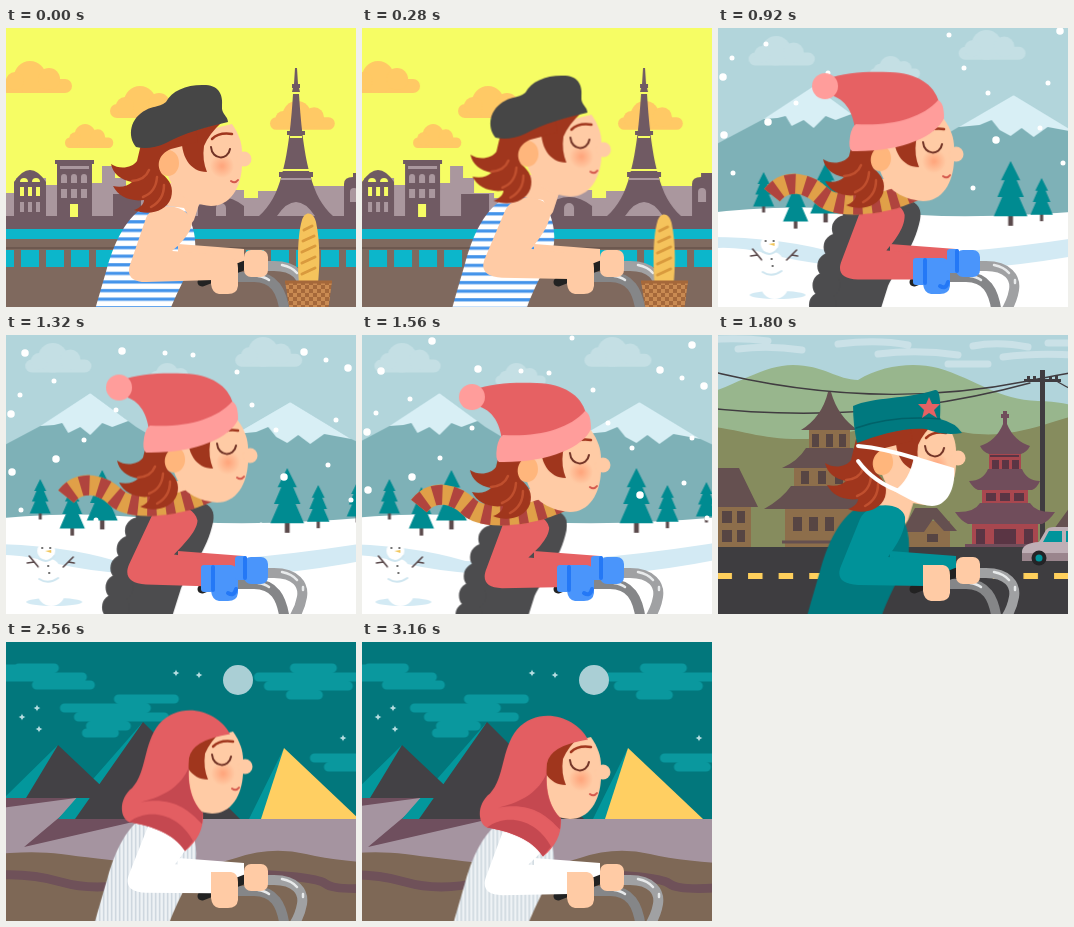
Write an HTML page without scripts that moves like this. It is 350 by 279 pixels and loops after 3200 ms.

```html
<!DOCTYPE html>
<html lang="en">
<head>
<meta charset="utf-8">
<title>Cycling round the world</title>
<style>
html, body { margin: 0; width: 100%; height: 100%; overflow: hidden; }
svg { display: block; width: 100%; height: 100%; }

/* four scenes of 0.8s each */
.paris, .winter, .china, .egypt { animation: show 3.2s step-end infinite; }
.winter { animation-delay: -2.4s; }
.china { animation-delay: -1.6s; }
.egypt { animation-delay: -.8s; }
@keyframes show { 0% { visibility: visible } 25%, 100% { visibility: hidden } }

.hair { animation: hair 3.2s step-end infinite; }
@keyframes hair { 0% { visibility: visible } 75%, 100% { visibility: hidden } }

.pan { animation: pan .8s steps(20) infinite; }
@keyframes pan { from { transform: translateX(var(--a)) } to { transform: translateX(var(--b)) } }
.fall { animation: fall .8s steps(20) infinite; }
@keyframes fall { from { transform: translateY(-39px) } to { transform: translateY(21px) } }

.bob { animation: bob .8s linear infinite; }
@keyframes bob {
  0%, 100% { transform: none }
  12.5% { transform: translate(calc(var(--k) * -.5px), calc(var(--k) * -4px)) }
  25% { transform: translate(calc(var(--k) * 2px), calc(var(--k) * -8px)) }
  50% { transform: translate(calc(var(--k) * 5.5px), calc(var(--k) * -11.5px)) }
  65% { transform: translate(calc(var(--k) * 6px), calc(var(--k) * -10.5px)) }
  75% { transform: translate(calc(var(--k) * 6.3px), calc(var(--k) * -7px)) }
  95% { transform: translate(calc(var(--k) * 3px), calc(var(--k) * -1px)) }
}
.sway { animation: sway .8s linear infinite; }
@keyframes sway { 0%, 100% { transform: none } 75% { transform: translate(-1px, 2px) } }

.sleeve { animation: sleeve 3.2s step-end infinite; }
@keyframes sleeve { 0% { fill: #ffcba5 } 25% { fill: #e66163 } 50% { fill: #009299 } 75%, 100% { fill: #fff } }
.hand { animation: hand 3.2s step-end infinite; }
@keyframes hand { 0%, 50%, 100% { fill: #ffcba5 } 25% { fill: #4a95fb } }
.line { fill: none; stroke-linecap: round; }
</style>
</head>
<body>
<svg viewBox="0 0 350 279">
<defs>
  <g id="cloud"><rect y="18" width="72" height="14" rx="7"/><circle cx="30" cy="16" r="16"/><circle cx="49" cy="18" r="11"/><circle cx="15" cy="20" r="9"/></g>
  <g id="tree"><path fill="#5b4a4c" d="M-2 40h4v14h-4z"/><path fill="#008b91" d="M0 0L8 16H5L11 30H7L14 46H-14L-7 30H-11L-5 16H-8Z"/></g>
  <path id="star" d="M0-3.5Q.5-.5 3.5 0Q.5 .5 0 3.5Q-.5 .5-3.5 0Q-.5-.5 0-3.5Z"/>
  <path id="torso" d="M148 176C124 180 109 212 101 240C96 258 91 274 84 300H158C168 265 185 243 189 224C191 205 184 190 178 180Z"/>
  <pattern id="fence" x="15" y="222" width="25" height="18" patternUnits="userSpaceOnUse"><rect width="18" height="18" fill="#0cb6cb"/></pattern>
  <pattern id="stripes" width="20" height="8.6" patternUnits="userSpaceOnUse"><rect width="20" height="9" fill="#fff"/><rect y="3" width="20" height="3.2" fill="#4393ea"/></pattern>
  <pattern id="pin" width="4" height="8" patternUnits="userSpaceOnUse"><rect width="4" height="8" fill="#eef2f5"/><rect width="1.5" height="8" fill="#ccd6de"/></pattern>
  <pattern id="weave" x="279" y="253" width="8" height="8" patternUnits="userSpaceOnUse"><rect width="8" height="8" fill="#c98a52"/><path fill="#a5683a" d="M0 0h4v4H0zM4 4h4v4H4z"/></pattern>
  <radialGradient id="blush"><stop offset=".1" stop-color="#ff9c72" stop-opacity=".75"/><stop offset="1" stop-color="#ff9c72" stop-opacity="0"/></radialGradient>
</defs>

<!-- Paris -->
<g class="paris">
  <rect width="350" height="279" fill="#f6fd64"/>
  <g class="pan" style="--a:0px;--b:-22.7px">
    <g fill="#ffc965">
      <use href="#cloud" x="-6" y="33"/><use href="#cloud" x="104" y="58"/>
      <use href="#cloud" transform="translate(59 96) scale(.67 .75)"/>
      <use href="#cloud" transform="translate(264 73) scale(.9)"/>
    </g>
    <path fill="#aa979e" d="M-5 165H10V150H40V157H52V163H86V155H96V138H109V150H120V165H140V170H195V162H238V170H252V163H298V158H340V165H390V201H-5Z"/>
    <g fill="#705a63">
      <path d="M-5 188H8V154Q24 130 40 154V188H51V136H49V132H88V136H86V188H107V166H135V188H192V178Q215 160 238 178V188H338V156Q338 149 347 149V145H378V188H390V202H-5Z"/>
      <path d="M289 40h2l1 16h2v4h-1l1 4h-8l1-4h-1v-4h2zM287 66h6C295 100 299 130 304 146C309 166 316 178 327 188H309Q290 160 271 188H253C264 178 271 166 276 146C281 130 285 100 287 66Z"/>
      <path d="M281 103h18v4h-18zM273 144h34v5h-34z"/>
    </g>
    <path stroke="#f6fd64" stroke-width="2" d="M284 109h12M276 142h28"/>
    <path stroke="#aa979e" stroke-width="2" d="M275 151h30"/>
    <g fill="#f6fd64">
      <path d="M14 154a4 4 0 0 1 8 0zM26 154a4 4 0 0 1 8 0zM64 176h8v13h-8z"/>
      <path d="M14 159h4v9h-4zM22 159h4v9h-4zM30 159h4v9h-4z"/>
    </g>
    <g fill="#aa979e">
      <path d="M54 138h29v3H54zM55 149a3 3 0 0 1 6 0v6h-6zM65 149a3 3 0 0 1 6 0v6h-6zM75 149a3 3 0 0 1 6 0v6h-6z"/>
      <path d="M55 161h6v9h-6zM65 161h6v9h-6zM75 161h6v9h-6zM14 174h4v10h-4zM22 174h4v10h-4zM30 174h4v10h-4z"/>
      <path d="M344 164a4 4 0 0 1 8 0v10h-8zM358 164a4 4 0 0 1 8 0v10h-8zM210 180a5 5 0 0 1 10 0v8h-10z"/>
    </g>
    <rect x="-5" y="201" width="400" height="11" fill="#0cb6cb"/>
    <rect x="-5" y="211" width="400" height="80" fill="#7f695e"/>
    <rect x="-5" y="222" width="400" height="17" fill="url(#fence)"/>
    <path stroke="#6d584f" stroke-width="2" d="M-5 220H395"/>
  </g>
</g>

<!-- Winter -->
<g class="winter">
  <rect width="350" height="279" fill="#b2d5db"/>
  <g class="pan" style="--a:15px;--b:-7.7px">
    <g fill="#c4dfe4">
      <use href="#cloud" transform="translate(19 8) scale(.92)"/>
      <use href="#cloud" transform="translate(229 2) scale(.93)"/>
      <use href="#cloud" transform="translate(140 28) scale(.7)"/>
    </g>
    <path fill="#7eb1b7" d="M-30 125L36 90L84 58L130 92L185 125L229 99L284 67L345 104L390 125V190H-30Z"/>
    <path fill="#d8eff5" d="M84 58L34 91L48 90L56 88L62 98L74 92L84 100L96 88L106 92L122 86ZM284 67L229 99L250 97L262 92L270 102L281 108L292 100L304 109L318 99L345 104Z"/>
    <path fill="#fff" d="M-30 186Q60 174 150 184T390 180V290H-30Z"/>
    <path fill="#d3eaf4" d="M-30 209Q50 208 110 226Q220 232 390 203V219Q270 245 180 241Q90 240 40 226Q0 216-30 222Z"/>
    <path fill="#fff" d="M-30 268Q30 252 90 268T390 258V290H-30Z"/>
    <use href="#tree" transform="translate(34 144) scale(.75)"/>
    <use href="#tree" transform="translate(66 152) scale(.9)"/>
    <use href="#tree" transform="translate(96 135) scale(1.1)"/>
    <use href="#tree" transform="translate(281 133) scale(1.2)"/>
    <use href="#tree" transform="translate(312 150) scale(.8)"/>
    <use href="#tree" transform="translate(351 147) scale(.75)"/>
    <ellipse cx="48" cy="267" rx="28" ry="4" fill="#d3eaf4"/>
    <path class="line" stroke="#5b4a4c" stroke-width="1.6" d="M33 233L23 221M28 227L21 228M57 232L67 222M62 227L68 228"/>
    <g fill="#fff"><circle cx="45" cy="257" r="14"/><circle cx="43" cy="235" r="11"/><circle cx="40" cy="216" r="9"/></g>
    <path class="line" stroke="#cfe6f0" stroke-width="2" d="M33 244Q42 250 52 243M33 224Q42 229 48 221"/>
    <path fill="#f2c65a" d="M39 216l6-1v3z"/>
    <path class="line" stroke="#444" stroke-width="2" d="M36 213h0M44 213h0M42 231h0M43 238h0"/>
  </g>
  <g class="fall line" stroke="#fff">
    <path stroke-width="5" d="M48 46h0M159 18h0M187 20h0M231 37h0M320 25h0M14 60h0M78 105h0M110 75h0M322 130h0M330 85h0M270 95h0M246 70h0M345 165h0M90 185h0M15 175h0M255 190h0M210-15h0"/>
    <path stroke-width="7.5" d="M19 18h0M116 16h0M298 17h0M342 33h0M5 79h0M50 124h0M278 142h0M6 137h0M70-12h0M330-8h0"/>
  </g>
</g>

<!-- China -->
<g class="china">
  <rect width="350" height="279" fill="#b1d4db"/>
  <g class="pan" style="--a:6.8px;--b:-20.5px">
    <path class="line" stroke="#cae1e7" stroke-width="7" d="M-10 5Q20 2 50 6M20 14Q50 10 84 15M120 9Q160 4 190 10M160 19Q200 14 240 20M255 11Q280 6 310 12M285 22Q330 16 390 23M230 29H270M330 8H390"/>
    <path fill="#98b68d" d="M-20 62C20 50 45 30 75 30S120 45 140 45C165 30 195 27 220 33C260 45 280 65 320 66S370 78 390 80V220H-20Z"/>
    <path fill="#868c5e" d="M-20 90C30 95 40 105 90 104C150 95 180 82 250 98C300 105 330 85 390 72V220H-20Z"/>
    <path class="line" stroke="#403c40" stroke-width="1.3" d="M-20 33Q150 78 310 46T400 40M-20 72Q150 92 312 48M340 47Q370 65 400 66"/>
    <path fill="#403c40" d="M322 35h5v178h-5zM306 44h37v3h-37zM309 41h3v3h-3zM315 41h3v3h-3zM331 41h3v3h-3zM337 41h3v3h-3z"/>
    <!-- left pagoda -->
    <path fill="#8d6e4b" d="M91 92h41v25H91zM76 128h70v25H76zM67 168h90v45H67z"/>
    <path fill="#655050" d="M110 57h3Q120 82 140 95H83Q104 82 110 57ZM88 113h47Q144 126 158 133H64Q80 126 88 113ZM73 151h76Q158 164 176 174H46Q64 164 73 151Z"/>
    <path fill="#574543" d="M94 99h7v13h-7zM108 99h7v13h-7zM121 99h7v13h-7zM83 136h8v13h-8zM100 136h8v13h-8zM117 136h8v13h-8zM75 182h9v14h-9zM91 182h9v14h-9zM107 182h9v14h-9z"/>
    <path stroke="#655050" stroke-width="3" d="M64 207H160"/>
    <!-- right pagoda -->
    <path fill="#a8474f" d="M271 117h32v22h-32zM264 151h46v22h-46zM254 184h66v29h-66z"/>
    <path fill="#704d5b" d="M285 76h4v3h2v4h-2v6Q296 106 312 111Q309 117 303 119H271Q265 117 262 111Q278 106 285 89v-6h-2v-4h2zM270 134h34Q309 146 322 146Q319 153 314 155H260Q255 153 251 146Q265 146 270 134ZM262 168h50Q318 178 337 177Q331 186 324 189H250Q243 186 237 177Q256 178 262 168Z"/>
    <path fill="#5a3544" d="M272 120h29v2h-29zM274 125h7v9h-7zM284 125h7v9h-7zM294 125h7v9h-7zM268 158h10v8h-10zM282 158h10v8h-10zM296 158h10v8h-10zM258 194h9v17h-9zM276 194h22v17h-22zM306 194h9v17h-9z"/>
    <path stroke="#704d5b" stroke-width="4" d="M247 211H327"/>
    <!-- houses -->
    <path fill="#8d6e4b" d="M-20 160H33V213H-20ZM190 186H232V213H190ZM342 190H385V213H342Z"/>
    <path fill="#655050" d="M-20 133H21L40 172H-20ZM184 197L197 173H219L239 196H226L215 184L206 197ZM336 194L352 172H390V193Z"/>
    <path fill="#574543" d="M4 176h10v12H4zM19 176h8v12h-8zM4 195h10v12H4zM19 195h8v12h-8zM209 199h11v8h-11zM358 198h8v9h-8z"/>
  </g>
  <rect y="212" width="350" height="67" fill="#3e3d40"/>
  <path class="pan" style="--a:12.7px;--b:-38px" stroke="#ffd05c" stroke-width="6" stroke-dasharray="14.5 16.1" d="M-61.8 241H420"/>
  <g class="pan" style="--a:441.7px;--b:-109.3px">
    <path fill="#bfafb6" d="M0 226V216Q1 208 17 207L24 195Q26 192 32 192H57Q62 192 65 196L72 207Q81 208 81 215V226Z"/>
    <path fill="#00949b" d="M21 207L27 196H40V207ZM44 196H57Q60 196 62 199L67 207H44Z"/>
    <path fill="#9a858d" d="M0 218H81V226H0Z"/>
    <g fill="#232326"><circle cx="17" cy="223" r="7.5"/><circle cx="65" cy="223" r="7.5"/></g>
    <g fill="#00949b"><circle cx="17" cy="223" r="3.5"/><circle cx="65" cy="223" r="3.5"/></g>
  </g>
</g>

<!-- Egypt -->
<g class="egypt">
  <rect width="350" height="279" fill="#02777c"/>
  <path class="line pan" style="--a:2px;--b:-6px" stroke="#0a989e" stroke-width="9" d="M-10 35H76M12 26H48M30 43H84M-10 27H15M112 57H168M58 66H140M72 75H158M84 84H120M80 91H108M288 26H326M252 35H360M262 44H342M284 53H312M308 116H370M322 125H350"/>
  <circle cx="232" cy="38" r="15" fill="#aacfd5"/>
  <g fill="#b5dde0">
    <use href="#star" x="16" y="75"/><use href="#star" x="31" y="66"/><use href="#star" x="33" y="87"/>
    <use href="#star" x="170" y="31"/><use href="#star" x="193" y="33"/><use href="#star" x="337" y="96"/>
  </g>
  <g class="pan" style="--a:3.2px;--b:-12.8px">
    <path fill="#a594a0" d="M-20 155H160V177H390V290H-20Z"/>
    <path fill="#6f4f5e" d="M-20 156H70L-20 168ZM18 205L68 163L140 177Z"/>
    <path fill="#03979c" d="M52 103L-2 156H30ZM137 80L52 177H80ZM278 106L243 177H260Z"/>
    <path fill="#434145" d="M52 103L20 156H108ZM137 80L69 177H234Z"/>
    <path fill="#ffcf62" d="M278 106L255 177H353Z"/>
    <path fill="#7e6856" d="M-20 213Q25 208 55 212T140 222T230 216T300 212T390 222V290H-20Z"/>
    <path class="line" stroke="#6f5159" stroke-width="9" d="M-20 234Q20 230 55 240T130 240T240 232T320 242T390 244"/>
  </g>
</g>

<!-- rider's body -->
<g class="bob" style="--k:.85">
  <path fill="#ffcba5" d="M160 155H200L188 192L178 206L148 190Z"/>
  <use class="paris" href="#torso" fill="url(#stripes)"/>
  <g class="winter">
    <path fill="#4c4c4e" d="M140 176H190Q205 180 202 196C196 225 178 245 170 262L158 300H100Z"/>
    <path class="line" stroke="#4c4c4e" stroke-width="27" stroke-dasharray="0 20" d="M138 188Q110 225 102 300"/>
  </g>
  <use class="china" href="#torso" fill="#00797f"/>
  <use class="egypt" href="#torso" fill="url(#pin)"/>
</g>

<!-- handlebars -->
<g class="line" stroke-width="10">
  <path stroke="#858688" d="M226 249H248C268 249 276 262 279 286"/>
  <path stroke="#a0a1a3" d="M240 238H268C290 238 298 250 296 262Q294 274 286 286"/>
  <path stroke="#e8eaeb" stroke-width="2.5" d="M276 237Q286 239 291 245M252 248Q259 249 263 252M297 252v3"/>
</g>
<path class="sleeve" d="M172 216L238 221V237H172Z"/>
<path class="line" stroke="#222" stroke-width="9" d="M196 254L242 236"/>
<rect class="hand" x="238" y="222" width="24" height="27" rx="7"/>

<path class="sleeve">
  <animate attributeName="d" dur=".8s" repeatCount="indefinite" keyTimes="0;.25;.55;.75;1" values="
    M140 190C148 172 182 176 186 194C186 205 172 218 166 223L207 226V252L140 254C124 254 120 246 125 234Z;
    M142 184C150 166 184 166 187 182C188 198 176 213 170 222L207 225V251L140 250C124 249 118 243 123 231Z;
    M145 180C153 162 187 166 191 184C191 196 174 212 168 219L207 225V251L140 249C124 248 118 241 123 229Z;
    M146 183C154 165 188 169 192 187C191 199 174 214 168 220L207 226V252L140 250C124 249 118 242 123 230Z;
    M140 190C148 172 182 176 186 194C186 205 172 218 166 223L207 226V252L140 254C124 254 120 246 125 234Z"/>
</path>
<path class="hand" d="M205 230H225Q232 231 232 240V258Q231 266 222 266H213Q206 265 205 256Z"/>
<g class="winter">
  <rect x="195" y="230" width="14" height="27" rx="3" fill="#4a95fb"/><rect x="229" y="221" width="12" height="24" rx="3" fill="#4a95fb"/>
  <path class="line" stroke="#2478f6" stroke-width="4" d="M207 232V255M239 223V243M222 258Q228 262 230 254"/>
</g>

<!-- head -->
<g class="bob" style="--k:1">
  <g class="winter" transform="translate(-6 11)" fill="none" stroke-width="20">
    <path stroke="#e0a048" d="M60 161C75 142 98 150 110 162S165 174 202 157"/>
    <path stroke="#b0443e" stroke-dasharray="9 9" d="M60 161C75 142 98 150 110 162S165 174 202 157"/>
  </g>
  <path fill="#ffcba5" d="M160 112L226 96C233 106 236 115 236 124V138C235 160 224 178 205 178C182 176 165 165 160 140Z"/>
  <circle cx="238" cy="131" r="7.5" fill="#ffcba5"/>
  <circle cx="216" cy="138" r="12" fill="url(#blush)"/>
  <g class="line" stroke="#713326" stroke-width="2">
    <path d="M205 119C206 132 222 133 224 121"/>
    <path stroke="#a0361d" stroke-width="2.5" d="M206 111Q213 104 226 106"/>
    <path stroke="#d4584c" d="M225 153Q229 156 232 152"/>
  </g>
  <path fill="#a0361d" d="M176 106L216 94Q203 106 198 118Q196 132 201 144C184 144 174 128 176 106Z"/>
  <g class="hair">
    <ellipse cx="162" cy="135" rx="11" ry="13" fill="#ffb67c"/>
    <path fill="#a0361d" d="M136 112L190 101L192 114L165 121C152 126 150 138 156 146C164 152 168 160 165 170C160 184 142 188 128 182C134 180 138 176 138 172C124 174 112 168 107 158C115 160 122 158 126 154C115 152 107 146 105 136C114 142 126 140 131 133Z"/>
    <path class="line" stroke="#c1502f" stroke-width="2.5" d="M158 157Q158 172 145 179M151 149Q150 164 137 169M143 142Q139 152 126 153"/>
  </g>

  <path class="paris" fill="#464646" d="M130 119C121 108 124 90 140 82C146 78 152 80 160 74C166 62 182 56 200 57C214 58 217 68 216 78C215 86 222 88 222 94C200 99 178 105 160 115C150 120 138 121 130 119Z"/>

  <g class="winter" transform="translate(-6 11)">
    <path fill="#e66163" d="M113 45C135 38 155 37 178 38C205 39 222 50 227 68C215 88 180 96 143 95C141 78 133 62 113 60Z"/>
    <path fill="#ff9d9b" d="M144 90C180 92 210 84 226 66Q232 68 232 84C224 102 190 118 140 117Q136 115 138 102Q140 92 144 90Z"/>
    <circle cx="113" cy="52" r="13" fill="#ff9d9b"/>
  </g>

  <g class="china" transform="translate(-2 8)">
    <path class="line" stroke="#fff" stroke-width="4" d="M140 111Q165 113 200 124M140 126Q156 148 184 157"/>
    <path fill="#fff" d="M196 121L236 133C238 155 228 171 214 171C200 170 190 164 176 156Q192 145 196 121Z"/>
    <path fill="#00797f" d="M135 71C155 62 190 64 217 55C222 54 223 68 222 84Q238 88 244 98Q225 101 208 94C185 92 160 100 139 108Q135 90 135 71Z"/>
    <path class="line" stroke="#006269" stroke-width="1.5" d="M138 93Q175 80 222 84"/>
    <path fill="#e66163" d="M211 62l3 7 8 0-6 6 3 8-8-5-7 5 2-8-6-6 8 0z"/>
  </g>

  <g class="egypt" transform="translate(0 6.5)">
    <path fill="#e35e62" d="M223 92C212 70 175 57 152 82C136 102 140 130 125 146C112 156 112 175 122 180C145 184 168 192 178 209C192 198 197 184 196 171C184 160 180 140 182 116Q185 98 223 92Z"/>
    <path fill="#c54850" d="M182 125C180 142 184 160 196 171L195 182C180 166 165 155 134 160C158 154 174 144 182 125ZM122 180C142 165 172 172 186 199L178 209C166 191 145 184 122 180Z"/>
  </g>
</g>

<!-- bread basket -->
<g class="paris">
  <g class="sway">
    <path fill="#f5c35c" d="M293 256C291 230 292 205 296 192C299 182 308 184 310 194C314 212 314 235 312 256Z"/>
    <path class="line" stroke="#d99a3d" stroke-width="3" d="M298 202l8-4M297 213l11-5M296 224l13-6M296 235l13-6M296 246l13-6"/>
  </g>
  <path fill="url(#weave)" d="M279 253H326L322 284H284Z"/>
  <path stroke="#a5683a" stroke-width="3" d="M279 254H326"/>
</g>
</svg>
</body>
</html>
```
